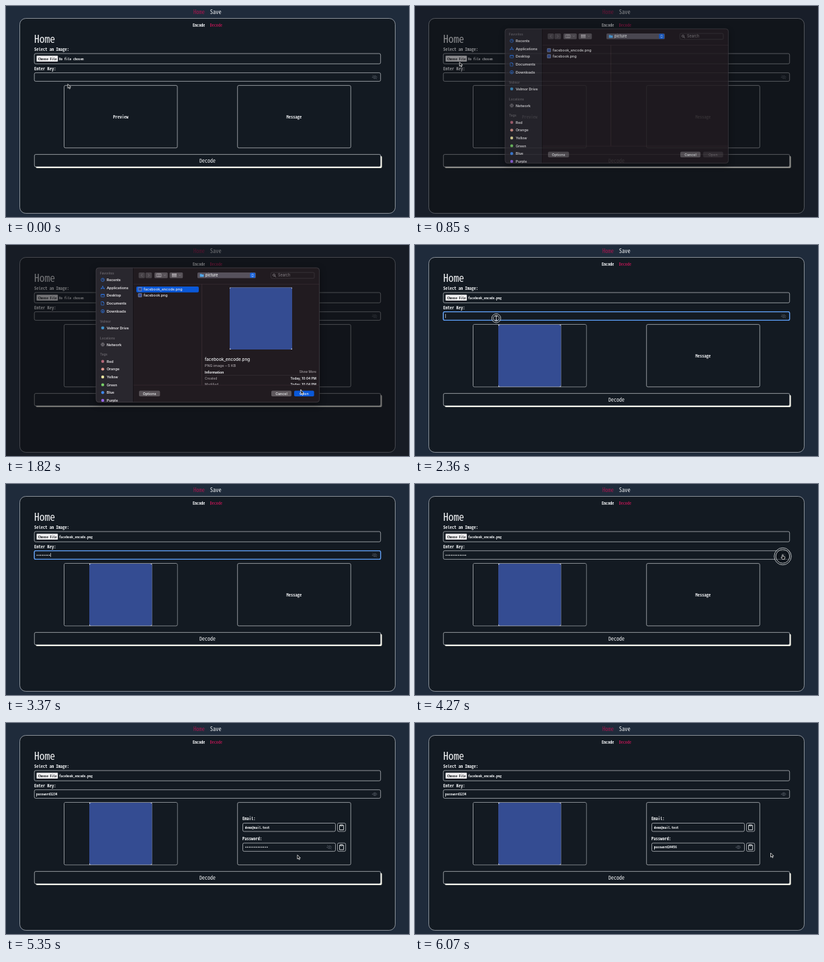
Write an HTML page that moves like this. It is 600 px wide and 315 px high and loops after 6.09 s.

```html
<!DOCTYPE html>
<html lang="en">
<head>
<meta charset="utf-8">
<title>Decode demo</title>
<style>
  html, body { margin: 0; width: 100%; height: 100%; overflow: hidden; background: #1f2b3b; }
  svg { display: block; width: 100vw; height: 100vh; }
  .mono { font-family: "Noto Sans Mono CJK JP", "Noto Sans Mono CJK SC", "Noto Sans Mono", monospace; }
  .dots { font-family: "DejaVu Sans Mono", monospace; font-weight: 700; }
  .ui { font-family: Inter, Roboto, sans-serif; }
  .window { filter: drop-shadow(0 3px 5px rgba(0, 0, 0, .5)); }
</style>
</head>
<body>
<svg id="stage" viewBox="0 0 600 315" xmlns="http://www.w3.org/2000/svg"></svg>
<script>
const LOOP = 6090;
const WHITE = '#f3f5f7', LINE = '#e6e9ec', PANEL = '#131a22', BRAND = '#344c92', ACCENT = '#0a58d8';

// Markup helpers; text is placed by its vertical middle.
const rect = (x, y, w, h, r = 0, fill = 'none', more = '') =>
  `<rect x="${x}" y="${y}" width="${w}" height="${h}" rx="${r}" fill="${fill}" ${more}/>`;
const path = (d, stroke, width = 0.7, more = '') =>
  `<path d="${d}" fill="none" stroke="${stroke}" stroke-width="${width}" stroke-linecap="round" stroke-linejoin="round" ${more}/>`;
const text = (family, s, x, y, size, fill = WHITE, more = '') =>
  `<text class="${family}" x="${x}" y="${y + size * 0.36}" font-size="${size}" fill="${fill}" ${more}>${s}</text>`;
const MID = 'text-anchor="middle"', END = 'text-anchor="end"';
const MEDIUM = 'font-weight="500"', SEMI = 'font-weight="600"', BOLD = 'font-weight="700"';
const ui = (...args) => text('ui', ...args);
const mono = (s, x, y, size, fill = WHITE, more = '') =>
  text('mono', s, x, y + size * 0.03, size, fill, `${more} ${size < 7 ? BOLD : ''}`);
const group = (id, body, more = '') => `<g id="${id}" ${more}>${body}</g>`;
const outline = (x, y, w, h, r = 2) => rect(x, y, w, h, r, PANEL, `stroke="${LINE}" stroke-width="0.6"`);

const eye = (id, x, y) => `<g transform="translate(${x} ${y})">` +
  path('M-3.4 0Q0 -4.6 3.4 0Q0 4.6 -3.4 0Z', '#59616b') +
  '<circle r="1.2" fill="none" stroke="#59616b" stroke-width=".7"/>' +
  group(id, path('M-3 -2.8L3 2.8', PANEL, 1.6) + path('M-3 -2.8L3 2.8', '#59616b')) + '</g>';

const clipboard = y => outline(493.5, y, 12.2, 12.4) +
  `<g transform="translate(499.6 ${y + 6.2})">` +
  path('M-1.4 -3H-3V3.8H3V-3H1.4M-1.4 -3.8H1.4V-2.2H-1.4Z', WHITE, 0.8) + '</g>';

const image = (x, y, w, h) => rect(x, y, w, h, 0, WHITE) + rect(x, y, w, h, 3, BRAND);

function page() {
  return rect(0, 0, 600, 315, 0, '#1f2b3b') +
    mono('Home', 279, 9, 8.5, '#a3174d') + mono('Save', 303.7, 9, 8.5) +
    rect(20.5, 18.5, 559, 291, 9, PANEL, `stroke="${LINE}" stroke-width="0.55"`) +
    mono('Encode', 278, 28.5, 6.1) + mono('Decode', 303.7, 28.5, 6.1, '#a3174d') +
    mono('Home', 42, 48.5, 15.5) +
    mono('Select an Image:', 42, 64.5, 6.5) +
    outline(42.2, 71, 515.5, 15.3) +
    group('fileButton', rect(45.5, 74.3, 31.7, 8.8, 0.8, '#f0f0f2') + mono('Choose File', 48, 78.7, 5, '#15181c')) +
    mono('No file chosen', 79, 78.8, 5.25, WHITE, 'id="fileName"') +
    mono('Enter Key:', 42, 93.3, 6.5) +
    outline(42.2, 99.7, 515.5, 12.7) +
    group('focus', rect(42.2, 99.7, 515.5, 12.7, 2, 'none', 'stroke="#5a9cf5" stroke-width="1.3"')) +
    text('dots', '', 45, 106.1, 4.4, WHITE, 'id="keyDots"') +
    mono('password1234', 45, 105.7, 5.25, WHITE, 'id="keyPlain"') +
    rect(0, 103, 0.6, 6, 0, WHITE, 'id="caret"') +
    eye('keySlash', 549, 106.2) +
    outline(86.5, 118.6, 168.6, 93.2) + mono('Preview', 170.8, 165.2, 6.5, WHITE, MID) +
    group('picture', rect(87, 119.1, 167.6, 92.2, 1.5, PANEL) + image(124, 119, 93.3, 92.6)) +
    outline(344.7, 118.6, 168.6, 93.2) +
    mono('Message', 428.8, 165.2, 6.5, WHITE, `id="placeholder" ${MID}`) +
    group('message',
      mono('Email:', 352, 142.7, 6.5) + outline(352.5, 149.5, 138, 12.4) +
      mono('demo@mail.test', 355.7, 155.7, 5.25) + clipboard(149.5) +
      mono('Password:', 352, 172.5, 6.5) + outline(352.5, 179.2, 138, 12.4) +
      text('dots', '•'.repeat(13), 355.7, 185.7, 4.4, WHITE, 'id="secretDots"') +
      mono('password24456', 355.7, 185.3, 5.25, WHITE, 'id="secretPlain"') +
      eye('secretSlash', 481.5, 185.4) + clipboard(179.2)) +
    rect(44.4, 223.8, 515.3, 18.1, 2, '#f4f4e8', 'id="shadow"') +
    rect(42.3, 221.6, 515.5, 18.4, 2, PANEL, `id="decode" stroke="${LINE}" stroke-width="0.6"`) +
    mono('Decode', 300, 230.8, 8, WHITE, `id="decodeLabel" ${MID}`);
}

const sidebarIcons = {
  Recents: '<circle r="2.4" fill="none" stroke="#2f7cf0" stroke-width=".7"/>' + path('M0 -1.4V0H1.2', '#2f7cf0', 0.6),
  Applications: path('M-2.3 2.2L.3 -2.4M2.3 2.2L-.3 -2.4M-2.6 .9H2.6', '#2f7cf0'),
  Desktop: rect(-2.6, -2, 5.2, 4, 0.7, 'none', 'stroke="#2f7cf0" stroke-width=".7"') + path('M-2.4 -1H2.4', '#2f7cf0'),
  Documents: path('M-1.8 -2.6H.5L1.8 -1.2V2.6H-1.8ZM.4 -2.4V-1H1.7', '#2f7cf0', 0.6),
  Downloads: '<circle r="2.4" fill="none" stroke="#2f7cf0" stroke-width=".7"/>' + path('M0 -1.3V1.2M-1 .3L0 1.3L1 .3', '#2f7cf0', 0.6),
  'Velmor Drive': '<circle r="2.3" fill="#3f8fc4"/>',
  Network: '<circle r="2.4" fill="none" stroke="#8e8b90" stroke-width=".6"/>' +
    path('M-2.4 0H2.4M0 -2.4Q-2.2 0 0 2.4Q2.2 0 0 -2.4', '#8e8b90', 0.5)
};
const tags = { Red: '#b5697a', Orange: '#e29a90', Yellow: '#efe6a0', Green: '#78cf68', Blue: '#3f86ea', Purple: '#9565ea' };

function sidebar() {
  const heading = (s, y) => ui(s, 140, y, 4.7, '#67646a', SEMI);
  const item = (s, icon, y) => `<g transform="translate(144 ${y})">${icon}</g>` + ui(s, 150, y, 5.3, '#eae8eb', SEMI);
  const places = Object.keys(sidebarIcons);
  return heading('Favorites', 42.3) +
    places.slice(0, 5).map((s, i) => item(s, sidebarIcons[s], 52 + i * 11.7)).join('') +
    heading('Velmor', 114.2) + item(places[5], sidebarIcons[places[5]], 123.7) +
    heading('Locations', 139) + item(places[6], sidebarIcons[places[6]], 148.6) +
    heading('Tags', 163.8) +
    Object.entries(tags).map(([s, c], i) => item(s, `<circle r="2.2" fill="${c}"/>`, 173.7 + i * 11.65)).join('');
}

function toolbar() {
  const chevron = x => path(`M${x - 1} 44.6L${x} 45.6L${x + 1} 44.6`, '#a5a0a5', 0.6);
  return rect(197.5, 41, 9.3, 8.5, 1.5, '#474247') + rect(207.7, 41, 9.5, 8.5, 1.5, '#474247') +
    path('M203 43.4L201.4 45.2L203 47M211.8 43.4L213.4 45.2L211.8 47', '#7b757b') +
    rect(221, 41, 19.8, 8.5, 1.5, '#575157') + rect(243.5, 41, 19.8, 8.5, 1.5, '#575157') +
    path('M224.5 43H231V47.4H224.5ZM226.7 43V47.4M228.8 43V47.4', '#c2bdc2', 0.6) + chevron(236.3) +
    path('M247.5 43.4H253.5M247.5 45.2H253.5M247.5 47H253.5', '#c2bdc2', 1.2, 'stroke-dasharray="1.3 1.1" stroke-linecap="butt"') + chevron(258.8) +
    rect(285, 41, 87, 8.6, 1.7, '#56515c') +
    '<path d="M288.7 43.2H291.2L291.8 43.9H294.4V47.6H288.7Z" fill="#51a7ea"/>' +
    ui('picture', 297, 45.2, 5.5, WHITE, MEDIUM) +
    rect(363.3, 41.6, 7.6, 7.5, 1.5, '#1763de') +
    path('M365.9 44.6L367.1 43.3L368.3 44.6M365.9 46.2L367.1 47.5L368.3 46.2', WHITE) +
    rect(394.3, 41, 64.7, 8.8, 1.7, '#211b20', 'stroke="#464046" stroke-width=".6"') +
    '<circle cx="399" cy="44.9" r="1.6" fill="none" stroke="#aaa5aa" stroke-width=".6"/>' + path('M400.2 46.2L401.6 47.6', '#aaa5aa') +
    ui('Search', 405, 45.4, 5.5, '#8b858a');
}

function details() {
  const row = (name, y) => ui(name, 296, y, 4.8, '#a29ca1', MEDIUM) + ui('Today, 10:04 PM', 462, y, 4.8, WHITE, `${END} ${SEMI}`);
  return rect(194, 62, 93, 8.7, 1.8, ACCENT) +
    image(333, 63.6, 93, 92.4) +
    ui('facebook_encode.png', 296, 171.2, 6.3, WHITE, MEDIUM) +
    ui('PNG image – 5 KB', 296, 180, 5.4, '#a8a2a7', MEDIUM) +
    ui('Information', 296, 189.8, 5, WHITE, BOLD) + ui('Show More', 462, 189.8, 4.7, '#a8a2a7', `${END} ${MEDIUM}`) +
    rect(296, 194.2, 166, 0.5, 0, '#3b343a') +
    row('Created', 199.2) + `<g clip-path="url(#detailClip)">${row('Modified', 208.6)}</g>`;
}

function dialog() {
  const file = (s, y) => rect(197, y - 2.6, 5, 5.2, 0.4, BRAND, 'stroke="#d8dbe4" stroke-width=".4"') + ui(s, 205, y, 5.4, '#f2f0f2', MEDIUM);
  const button = (s, x, w, fill) => rect(x, 217.6, w, 8.4, 1.8, fill) + ui(s, x + w / 2, 221.8, 5.3, WHITE, `${MID} ${MEDIUM}`);
  return rect(134, 34, 332.6, 200.7, 4, '#211b20', 'class="window"') +
    `<g clip-path="url(#dialogClip)">` + rect(134, 34, 55, 201, 0, '#29272e') + sidebar() +
    rect(189, 34, 0.8, 201, 0, '#151216') + rect(189.8, 58, 277, 0.6, 0, '#3a2c33') + rect(189.8, 208.8, 277, 0.6, 0, '#3a2c33') +
    rect(291.4, 58.3, 0.7, 150.5, 0, '#403037') + '</g>' + toolbar() +
    group('selected', details()) + file('facebook_encode.png', 66) + file('facebook.png', 75) +
    button('Options', 198, 31.3, '#575156') + button('Cancel', 395, 30, '#5f595e') +
    group('openIdle', rect(429, 217.6, 29.7, 8.4, 1.8, '#373136') + ui('Open', 443.8, 221.8, 5.3, '#777176', MID)) +
    group('openReady', button('Open', 429, 29.7, ACCENT)) +
    rect(134, 34, 332.6, 200.7, 4, 'none', 'stroke="#514d54" stroke-width=".6"');
}

const pointer = group('pointer',
  group('ring', '<circle id="ringOuter" fill="#080c12" fill-opacity=".55" stroke="#e4e7ea" stroke-width=".8"/>' +
    '<circle id="ringInner" fill="none" stroke="#e4e7ea" stroke-width=".8"/>') +
  group('arrow', '<path d="M0 0V6.2L1.5 4.9L2.5 7.2L3.6 6.7L2.6 4.5H4.5Z" fill="#0b0d10" stroke="#fff" stroke-width=".7"/>') +
  group('hand', '<path d="M-.7 -2.2Q0 -3 .6 -2.2V0L2.8 .6Q3.4 .8 3.3 1.6L2.7 4.4H-.6L-2.6 1.6Q-2.2 .7 -.7 1.6Z" fill="#0b0d10" stroke="#fff" stroke-width=".7"/>') +
  group('beam', path('M-1.3 -3.2Q0 -3.2 0 -2.4Q0 -3.2 1.3 -3.2M0 -2.4V2.4M-1.3 3.2Q0 3.2 0 2.4Q0 3.2 1.3 3.2', '#fff', 0.8)));

const stage = document.getElementById('stage');
stage.innerHTML = '<defs><clipPath id="dialogClip">' + rect(134, 34, 332.6, 200.7, 4, '#000') +
  '</clipPath><clipPath id="detailClip">' + rect(292, 195, 174, 13.8, 0, '#000') + '</clipPath></defs>' +
  page() + rect(0, 0, 600, 315, 0, '#101014', 'id="dim"') + group('dialog', dialog()) + pointer;

const el = {};
stage.querySelectorAll('[id]').forEach(node => el[node.id] = node);
const show = (id, on) => el[id].setAttribute('visibility', on ? 'inherit' : 'hidden');
const set = (id, attrs) => Object.entries(attrs).forEach(([k, v]) => el[id].setAttribute(k, v));

const clamp = v => Math.max(0, Math.min(1, v));
const ease = v => v * v * (3 - 2 * v);
const ramp = (t, from, to) => ease(clamp((t - from) / (to - from)));
const between = (t, a, b) => t >= a && t < b;

// Pointer stops: time, x, y.
const route = [
  [90, 92, 116.5], [450, 62, 78], [640, 62, 78], [1060, 70.5, 89.5], [1150, 70.5, 89.5],
  [1450, 232, 66], [1570, 232, 66], [1790, 439, 216.5], [1980, 439, 216.5],
  [2260, 121, 109.3], [3880, 121, 109.3], [4080, 547.5, 108], [4370, 547.5, 108],
  [4590, 294.5, 230.5], [5150, 294.5, 230.5], [5450, 481.5, 185.4], [5740, 481.5, 185.4], [6060, 529.5, 194]
];
const clicks = [480, 1480, 1820, 2275, 4080, 4610, 5500];

function pointerAt(t) {
  const next = route.findIndex(stop => stop[0] > t);
  if (next === 0) return route[0].slice(1);
  if (next < 0) return route[route.length - 1].slice(1);
  const [t0, x0, y0] = route[next - 1], [t1, x1, y1] = route[next];
  const p = ramp(t, t0, t1);
  return [x0 + (x1 - x0) * p, y0 + (y1 - y0) * p];
}

const typedCount = t => Math.max(0, Math.min(12, 1 + Math.floor((t - 2650) / 92)));

function draw(t) {
  const [x, y] = pointerAt(t);
  const open = ramp(t, 720, 900) * (1 - ramp(t, 1970, 2100));
  const selected = t >= 1490, loaded = t >= 2050, decoded = t >= 4720;
  const focused = between(t, 2290, 4090), keyShown = t >= 4310, secretShown = t >= 5560;
  const count = typedCount(t);
  const hover = between(t, 4370, 5400) && x > 42 && x < 558 && y > 221 && y < 241;

  set('dim', { opacity: 0.56 * open });
  set('dialog', { opacity: open });
  show('dialog', open > 0);
  show('selected', selected);
  show('openReady', selected);
  show('openIdle', !selected);

  el.fileName.textContent = loaded ? 'facebook_encode.png' : 'No file chosen';
  show('picture', loaded);
  show('focus', focused);
  show('caret', focused);
  set('caret', { x: 45 + count * 2.65 });
  el.keyDots.textContent = '•'.repeat(count);
  show('keyDots', !keyShown);
  show('keyPlain', keyShown);
  show('keySlash', !keyShown);

  show('placeholder', !decoded);
  show('message', decoded);
  show('secretDots', decoded && !secretShown);
  show('secretPlain', decoded && secretShown);
  show('secretSlash', decoded && !secretShown);

  show('shadow', !hover);
  set('decode', { fill: hover ? '#f1f3f6' : PANEL, stroke: hover ? 'none' : LINE });
  set('decodeLabel', { fill: hover ? '#15191f' : WHITE });

  const hand = between(t, 4060, 4390) || hover || between(t, 5430, 5770);
  const beam = between(t, 2230, 2650);
  set('pointer', { transform: `translate(${x} ${y})` });
  show('pointer', !between(t, 2650, 3890));
  show('hand', hand);
  show('beam', beam);
  show('arrow', !hand && !beam);

  const click = clicks.find(start => between(t, start, start + 240));
  show('ring', click !== undefined);
  if (click !== undefined) {
    const r = 0.5 + 12.2 * clamp((t - click) / 170);
    set('ringOuter', { r });
    set('ringInner', { r: Math.max(0, r - 2.4) });
  }
}

const start = performance.now();
function tick() {
  draw((performance.now() - start) % LOOP);
  requestAnimationFrame(tick);
}
tick();
</script>
</body>
</html>
```
